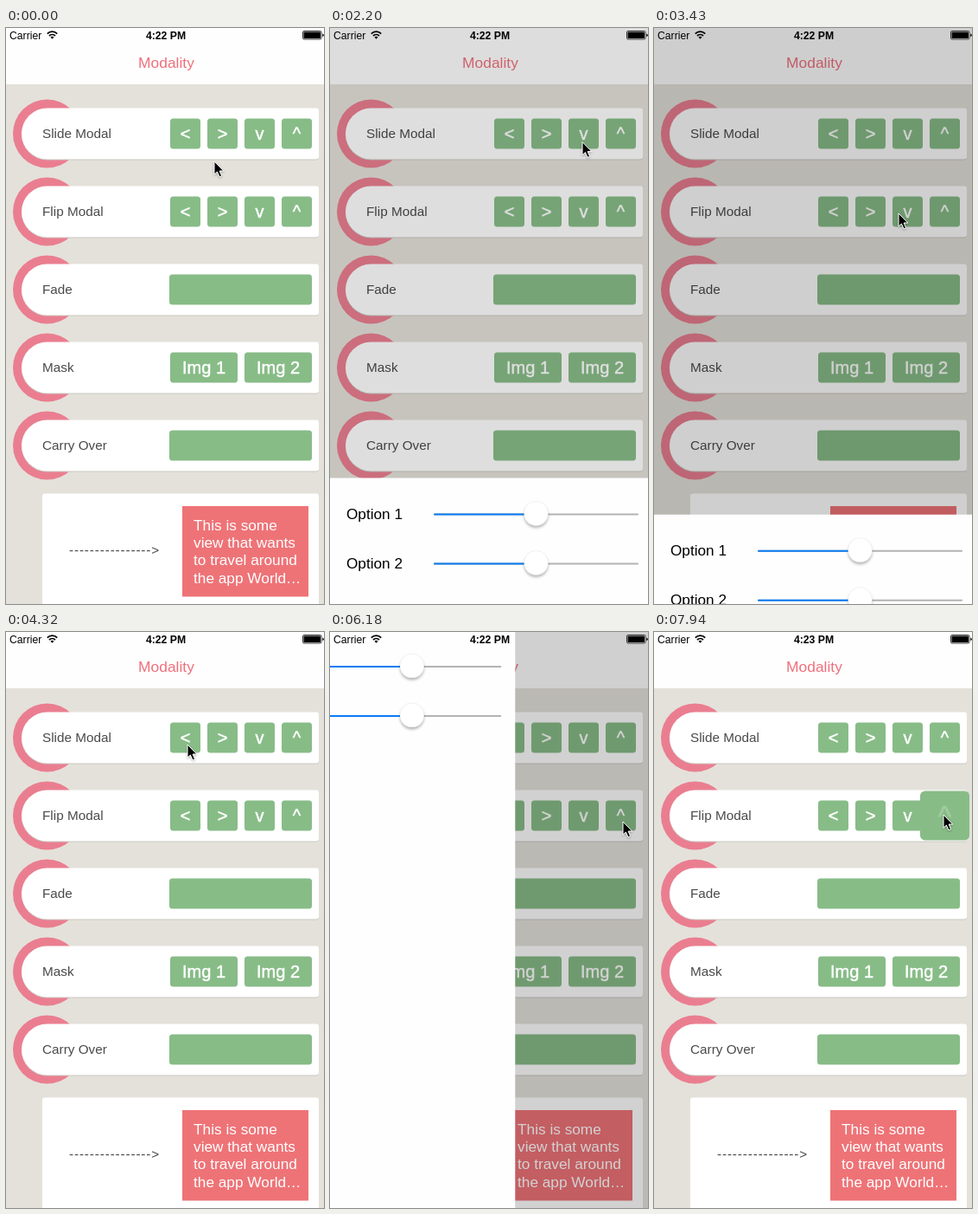
An HTML page for the animation above (8 s loop, 368x665 px).

```html
<!DOCTYPE html>
<html lang="en">
<head>
<meta charset="utf-8">
<title>Modality</title>
<style>
  html, body { margin: 0; width: 100%; height: 100%; overflow: hidden; background: #e4e1da; }
  svg { display: block; font-family: "Liberation Sans", Arial, sans-serif; }
  .label { font-size: 15.3px; fill: #4a4a4a; }
  .button rect { fill: #87bc87; }
  .button text { font-size: 20px; fill: #fff; stroke: #fff; stroke-width: .5; text-anchor: middle; }
  .option { font-size: 17.2px; }
  .note { font-size: 17.25px; fill: #fff; }
  .status { font-size: 12.2px; }
  .knob { fill: #fff; stroke: #000; stroke-opacity: .1; stroke-width: .5; }
</style>
</head>
<body>
<svg id="stage" width="368" height="665" viewBox="0 0 368 665">
  <defs>
    <filter id="soft" x="-50%" y="-50%" width="200%" height="200%">
      <feDropShadow dx="0" dy="2.5" stdDeviation="1.8" flood-color="#000" flood-opacity=".28"/>
    </filter>
    <filter id="drop" x="-50%" y="-50%" width="200%" height="200%">
      <feDropShadow dx="0" dy="1" stdDeviation=".8" flood-color="#000" flood-opacity=".35"/>
    </filter>
  </defs>
  <rect width="368" height="665" fill="#e4e1da"/>
  <rect width="368" height="65" fill="#fefefe"/>
  <text x="185.5" y="46" font-size="17.4" fill="#ee707c" text-anchor="middle">Modality</text>
  <g id="rows"></g>
  <rect x="42" y="538.5" width="320" height="140" rx="3" fill="#cbc8c2"/>
  <rect x="42" y="537.5" width="320" height="140" rx="3" fill="#fff"/>
  <text class="label" x="73" y="608" letter-spacing=".86">----------------&gt;</text>
  <rect x="204" y="552" width="146" height="104.5" fill="#ee7377"/>
  <g id="note" class="note"></g>
  <g id="buttons"></g>
  <rect id="dim" width="368" height="665" opacity="0"/>
  <g id="panels"></g>
  <g class="status">
    <text x="4" y="12.5">Carrier</text>
    <g fill="none" stroke="#000" stroke-width="1.8">
      <path d="M47.8 6.6a8 8 0 0 1 11.4 0M50 9a5 5 0 0 1 7 0"/>
      <path d="M53.5 12.8l-2-2.2a3 3 0 0 1 4 0z" fill="#000" stroke="none"/>
    </g>
    <text id="clock" x="185" y="12.5" font-weight="bold" text-anchor="middle"></text>
    <rect x="343.5" y="3.5" width="21.5" height="9.5" rx="1.5" fill="#fff" stroke="#000" stroke-width=".8"/>
    <rect x="344.5" y="4.5" width="19.5" height="7.5" rx=".6"/>
    <path d="M366.3 6.5q1.5 .4 1.5 1.8t-1.5 1.8z"/>
  </g>
  <path id="cursor" d="M0 0V15.2L3.4 12L6 17.8L8.6 16.7L6.1 11H10.8Z"
        stroke="#fff" stroke-width="1" filter="url(#drop)"/>
</svg>
<script>
const LOOP = 8000;
const DIM = 0.3;
const $ = id => document.getElementById(id);

function add(parent, tag, attrs, text) {
  const el = document.createElementNS("http://www.w3.org/2000/svg", tag);
  set(el, attrs);
  if (text) el.textContent = text;
  parent.appendChild(el);
  return el;
}

function set(el, attrs) {
  for (const name in attrs) el.setAttribute(name, attrs[name]);
}

function addButton(x, y, width, caption) {
  const cx = x + width / 2, cy = y + 17.5;
  const el = add($("buttons"), "g", { class: "button" });
  add(el, "rect", { x, y, width, height: 35, rx: 3.5 });
  const text = add(el, "text", { x: cx, y: y + 24.8 }, caption);
  return { el, text, cx, cy };
}

const arrows = ["<", ">", "v", "^"];
const rows = [
  ["Slide Modal", arrows], ["Flip Modal", arrows], ["Fade", [""]],
  ["Mask", ["Img 1", "Img 2"]], ["Carry Over", [""]]
];

const buttons = rows.map(([name, captions], i) => {
  const y = 92.5 + i * 90, group = $("rows");
  add(group, "circle", { cx: 47.5, cy: y + 29.5, r: 39.5, fill: "#ea7e90" });
  const shape = `M47.5 ${y}H359q3 0 3 3V${y + 56}q0 3-3 3H47.5a29.5 29.5 0 0 1 0-59z`;
  add(group, "path", { d: shape, fill: "#cbc8c2", transform: "translate(0 1)" });
  add(group, "path", { d: shape, fill: "#fff" });
  add(group, "text", { class: "label", x: 42, y: y + 34.7 }, name);
  const n = captions.length;
  const width = n === 1 ? 165 : (172 - 8 * n) / n - (n === 4 ? 0 : 0);
  return captions.map((c, k) => addButton((n === 1 ? 189 : 190) + k * (width + 8), y + 12, width, c));
});

["This is some", "view that wants", "to travel around", "the app World…"]
  .forEach((line, i) => add($("note"), "text", { x: 217, y: 580 + i * 20.2 }, line));

// Each panel holds two labelled sliders laid out between its edges.
function addPanel() {
  const el = add($("panels"), "g", {});
  const back = add(el, "rect", { fill: "#fefefe" });
  const options = [0, 1].map(i => ({
    label: add(el, "text", { class: "option" }, "Option " + (i + 1)),
    rest: add(el, "rect", { height: 2, rx: 1, fill: "#b3b3b3" }),
    done: add(el, "rect", { height: 2, rx: 1, fill: "#0b7cf3" }),
    knob: add(el, "circle", { class: "knob", r: 14, filter: "url(#soft)" })
  }));
  return { el, back, options };
}

function layoutPanel(panel, left, right, top) {
  const a = left + 122, b = right - 16, mid = (a + b) / 2;
  set(panel.back, { x: -10, y: top, width: Math.max(0, right + 10), height: 680 });
  panel.options.forEach((o, i) => {
    const y = top + 41 + i * 57;
    set(o.label, { x: left + 21, y: y + 6.2 });
    set(o.rest, { x: a, y, width: b - a });
    set(o.done, { x: a, y, width: mid - a });
    set(o.knob, { cx: mid, cy: y });
  });
}

const modals = [
  { open: 1940, close: 3260, panel: addPanel(),
    place: (panel, p) => layoutPanel(panel, -2, 373, 665 - 150 * p) },
  { open: 4680, close: 6000, panel: addPanel(),
    place: (panel, p) => layoutPanel(panel, -377 + 375 * p, -2 + 329 * p, -2) }
];

const pops = [
  { at: 1940, button: buttons[0][2] },
  { at: 4680, button: buttons[0][0] },
  { at: 7940, button: buttons[1][3] }
];

// time, x, y of the pointer tip
const path = [
  [0, 241, 154], [560, 241, 154], [900, 257, 176], [1200, 279, 158], [1410, 289, 128],
  [1460, 289, 128], [1670, 293, 121], [1940, 293, 121], [2730, 290, 153], [2820, 287, 182],
  [2910, 283, 214], [3450, 283, 214], [4050, 214, 133], [4180, 214, 133], [4320, 210, 130],
  [5030, 210, 130], [5460, 314, 198], [5500, 314, 198], [5730, 339, 219], [6300, 339, 219],
  [6790, 337, 237], [6850, 337, 237], [7230, 335, 211], [LOOP, 335, 211]
];

const clamp = v => Math.min(1, Math.max(0, v));
const smooth = v => v * v * (3 - 2 * v);

function spring(ms) {
  if (ms <= 0) return 0;
  const t = ms / 1000, k = 13.7, w = 10.83;
  return 1 - Math.exp(-k * t) * (Math.cos(w * t) + k / w * Math.sin(w * t));
}

function pointerAt(t) {
  const i = path.findIndex(p => p[0] > t);
  const [t0, x0, y0] = path[i - 1], [t1, x1, y1] = path[i];
  const f = (t - t0) / (t1 - t0);
  return [x0 + (x1 - x0) * f, y0 + (y1 - y0) * f];
}

function draw(t) {
  let shade = 0;
  for (const { open, close, panel, place } of modals) {
    const since = t - open - 60, after = t - close;
    const p = after < 0 ? spring(since) : 1 - smooth(clamp(after / 460));
    panel.el.style.display = p > 0 ? "" : "none";
    place(panel, p);
    shade += clamp(since / 460) * (1 - clamp(after / 460));
  }
  set($("dim"), { opacity: DIM * shade });

  for (const { at, button } of pops) {
    const age = t - at;
    const f = age < 0 ? 0 : 1 - smooth(clamp((age - 80) / 160));
    const { el, text, cx, cy } = button;
    if (f > 0 && el.nextSibling) el.parentNode.appendChild(el);
    set(el, { transform: `translate(${cx} ${cy}) scale(${1 + 0.63 * f}) translate(${-cx} ${-cy})` });
    set(text, { opacity: 1 - 0.8 * f });
  }

  set($("cursor"), { transform: `translate(${pointerAt(t)})` });
  $("clock").textContent = t < 7060 ? "4:22 PM" : "4:23 PM";
}

const start = performance.now();
function tick() {
  draw((performance.now() - start) % LOOP);
  requestAnimationFrame(tick);
}
tick();
</script>
</body>
</html>
```
